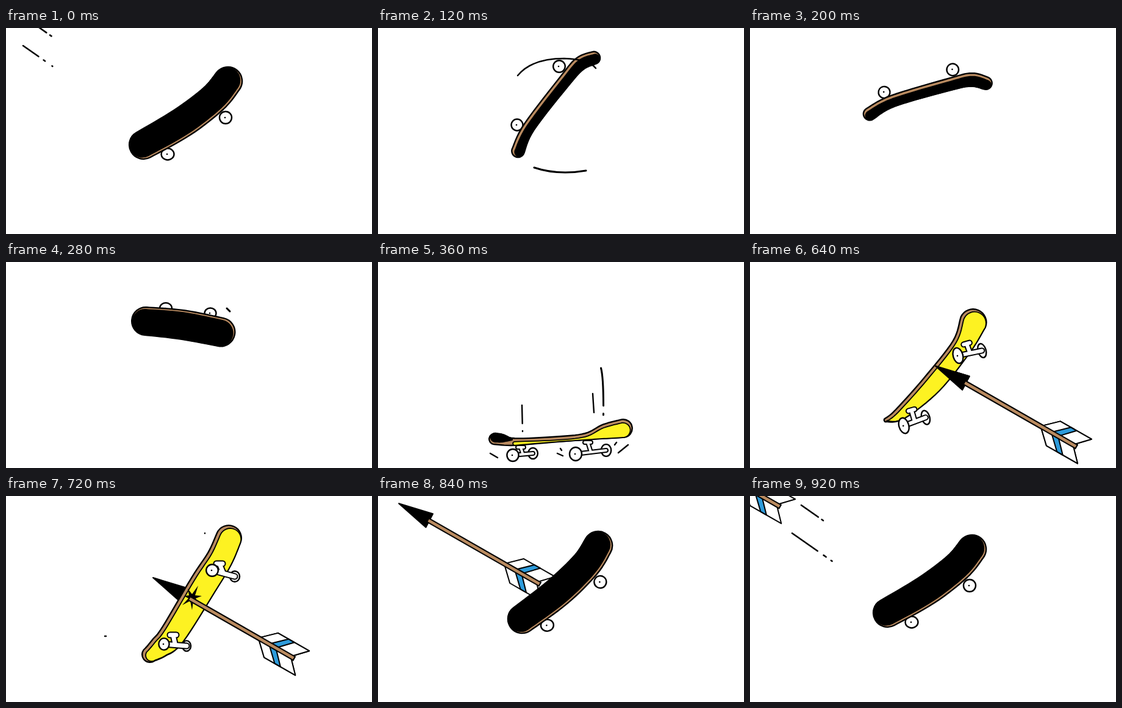
Animation, 600 px wide and 338 px high, one loop 960 ms. Source, as an HTML page:

```html
<!DOCTYPE html>
<html lang="en">
<head>
<meta charset="utf-8">
<title>Skateboard and arrow</title>
<style>
html, body { margin: 0; width: 100%; height: 100%; overflow: hidden; background: #fff; }
svg { display: block; width: 600px; height: 338px; }
</style>
</head>
<body>
<svg id="stage" viewBox="0 0 600 338" fill="none" stroke="#000" stroke-width="2.4" stroke-linecap="round" stroke-linejoin="round"></svg>
<script>
const LOOP = 960, TICK = 40;
const INK = '#000', WOOD = '#ba8b60', YELLOW = '#fdf222', BLUE = '#2d9bdb';
const stage = document.getElementById('stage');

const nodes = text => text.split(' ').map(s => s.split(',').map(Number));

// Smooth run of circles [x, y, r] through a few nodes
function spine(keys) {
  const at = i => keys[Math.max(0, Math.min(keys.length - 1, i))];
  const steps = (keys.length - 1) * 8;
  return Array.from({ length: steps + 1 }, (_, s) => {
    const i = Math.floor(s / 8), t = s / 8 - i;
    const [a, b, c, d] = [at(i - 1), at(i), at(i + 1), at(i + 2)];
    return [0, 1, 2].map(k => b[k] + t / 2 * (c[k] - a[k] +
      t * (2 * a[k] - 5 * b[k] + 4 * c[k] - d[k] + t * (3 * (b[k] - c[k]) + d[k] - a[k]))));
  });
}

// Round-ended outline around a spine, shrunk and shifted
function ribbon(keys, fill, shrink, [sx, sy] = [0, 0], w = 2.4) {
  const run = spine(keys), last = run.length - 1;
  const radius = i => Math.max(0.8, run[i][2] - shrink);
  const side = sign => run.map(([x, y], i) => {
    const p = run[Math.max(0, i - 1)], q = run[Math.min(last, i + 1)];
    const dx = q[0] - p[0], dy = q[1] - p[1], k = sign * radius(i) / Math.hypot(dx, dy);
    return [x + sx - dy * k, y + sy + dx * k].map(v => v.toFixed(2)).join();
  });
  const cap = i => `A${radius(i)} ${radius(i)} 0 0 0 `;
  const a = side(1), b = side(-1).reverse();
  return `<path d="M${a.join('L')}${cap(last)}${b.join('L')}${cap(0)}${a[0]}Z" fill="${fill}" stroke-width="${w}"/>`;
}

// Wooden body with a face pushed aside, so that the edge shows
function deck(text, face, shift, from = 0) {
  const keys = nodes(text), s = Math.hypot(...shift);
  return ribbon(keys, WOOD, 1.2) + ribbon(keys.slice(from), face, 1.2 + s, shift, 1.8);
}

const line = (d, w = 2.4, dash = 'none') =>
  `<path d="${d}" stroke-width="${w}" stroke-dasharray="${dash}"/>`;
const poly = (pts, fill) => `<polygon points="${pts}" fill="${fill}" stroke-width="2"/>`;
const wheel = (x, y, rx, ry = rx) =>
  `<ellipse cx="${x}" cy="${y}" rx="${rx}" ry="${ry}" fill="#fff"/>` +
  `<circle cx="${x - 1}" cy="${y}" r="1.3" fill="${INK}" stroke="none"/>`;

// Two wheels on an axle that hangs from a mount
function truck(near, far, mount, rx, ry, w) {
  const mid = near.map((v, k) => (v + far[k]) / 2);
  const d = `M${near}L${far}M${mid}L${mount}m-5,0h10`;
  return wheel(...far, rx * 0.82, ry * 0.9) +
    line(d, w) + `<path d="${d}" stroke="#fff" stroke-width="${w - 4}"/>` +
    wheel(...near, rx, ry);
}

const deckTop = wheel(360, 147, 10) + wheel(265, 207, 10.5, 9.5) +
  deck('225,192,24.5 289,155,25.5 340,116,25 364,87,24.5', INK, [-1.8, -1.2]);

const deckSide = wheel(228, 159, 9.5) + wheel(297, 63, 9.8) +
  deck('229.5,202,11.5 248,162,10.5 309,83,11 332,58,12 354,49,11.5', INK, [2.2, 1.7]);

const deckBack = wheel(262, 76, 10, 9) + wheel(335, 84, 9.5, 8.5) +
  deck('229,97,24 290,103,25 352,115,24.5', INK, [-1.4, 1.6]);

const landed =
  deck('191,290.5,10 224,295,7 290,291,5.5 340,286.5,6.5 372,278,13 402,273,16', YELLOW, [0, 2.8], 1) +
  ribbon(nodes('192,288,8 204,289,7 219,291,2'), INK, 1) +
  truck([324, 315], [374, 309], [344, 296], 10, 11, 8) +
  truck([221, 317], [254, 314], [234, 304], 9.6, 10, 8);

const rising =
  deck('201,274,4 228,270,11.5 290,238,17.5 354,192,18 383,159,23', YELLOW, [1.7, 2.4]) +
  truck([344, 205], [384, 208], [363, 190], 8, 13, 10) +
  truck([227, 291], [265, 288], [246, 270], 8, 13, 10);

// Torn hole, longest along the board
const hole = Array.from({ length: 14 }, (_, i) => {
  const a = i * Math.PI / 7 - 1.1;
  const r = i % 2 ? 6 : 13 + 9 * Math.cos(a + 1.1) ** 2;
  return [305 + r * Math.cos(a), 167 + r * Math.sin(a)].map(Math.round).join();
}).join(' ');

const pierced =
  deck('236,260,14 252,248,18.5 274,226,22 323,146,23.5 350,103,22.5 365,69,22', YELLOW, [2.7, 1.5]) +
  truck([338, 122], [375, 132], [350, 111], 9.8, 9.8, 11) +
  truck([259, 243], [296, 246], [274, 228], 8.6, 9.6, 11) +
  `<polygon points="${hole}" fill="${INK}" stroke="none"/>`;

// Tip at 0,0 and shaft along x
const vane = (a, b, fill) => [-1, 1].map(s =>
  poly(`${a},0 ${a + 24},${23 * s} ${b + 22},${23 * s} ${b},0`, fill)).join('');
const arrow = '<g transform="translate(241 134) rotate(29.8)">' +
  poly('0,0 57,-13 58,12', INK) + vane(199, 260, '#fff') + vane(219, 232, BLUE) +
  '<g stroke-linecap="butt">' + line('M55,0H267.5', 8.6) +
  `<path d="M56,0H265.5" stroke="${WOOD}" stroke-width="4.6"/></g></g>`;

const swirl = line('M229,78Q252,50 305,50Q345,51 357,66') + line('M256,229Q295,242 341,234', 3);
const nick = line('M362,76L367,81', 3);
const fall = line('M236,235L237,278', 2.4, '30 12 1') + line('M352,216L354,247') +
  line('M365.5,174Q370,190 369.5,251', 3, '62 13 3');
const bump = line('M184,314L196,321M294,314L303,318M299,306L301,309M388,300L391,296M394,313L410,300');
const pop = line('M331,212Q331,245 326,266M377,212Q381,250 370,283') +
  line('M390,225V257', 3.6, '18 10 3') + line('M297,279L317,264M306,274L315,267', 3) +
  line('M147,294L124,276L143,281M207,301L208,304M223,308V314M246,295V311M254,303L252,308M305,292H311');
const chips = line('M326,61V61.2M162,230H164');
const trail = (x, y, size, dash) =>
  line(`M${x},${y}l${size * 0.82},${size * 0.575}`, 2.6, dash);
const trailOut = trail(84, 15, 44, '34 7 3') + trail(69, 61, 80, '51 12 5 10 2');
const trailEnd = trail(54, -1, 25, '15 7 3') + trail(28, 29, 59, '31 10 3 14 1');

// [first tick, last tick, rest tick, art, drift per tick x, y, turn, pivot x, y, stays at rest]
const marks = [
  [2, 4, 3, swirl, 0, 0, 38, 295, 142],
  [6, 7, 7, nick, 0, 0, 8, 291, 106],
  [9, 10, 9, fall + bump, 0, 0, 0, 0, 0],
  [14, 15, 14, pop, 0, 5, 0, 0, 0],
  [18, 18, 18, chips, 0, 0, 0, 0, 0],
  [22, 23, 23, trailOut, -83, -49, 0, 0, 0],
  [0, 0, 0, trailEnd, 0, 0, 0, 0, 0]
];
const boards = [
  [0, 2, 0, deckTop, 0, -4, 53, 295, 140],
  [3, 5, 3, deckSide, 0, -5, 18, 291, 125],
  [6, 7, 7, deckBack, 0, 2, 12, 291, 106],
  [8, 12, 9, landed, 0, 88, 7, 300, 285, true],
  [13, 16, 14, rising, 0, -20, -8, 302, 210],
  [17, 20, 18, pierced, -3, -2, -3, 304, 168],
  [21, 23, 22, deckTop, -4, -2, 7, 295, 140, true]
];

function place(parts, tick) {
  return parts.filter(p => tick >= p[0] && tick <= p[1])
    .map(([, , rest, art, dx, dy, turn, cx, cy, stop]) => {
      const k = stop ? Math.min(0, tick - rest) : tick - rest;
      return `<g transform="translate(${dx * k} ${dy * k}) rotate(${turn * k} ${cx} ${cy})">${art}</g>`;
    }).join('');
}

// The arrow slows in the board, then pulls through
function flight(tick) {
  if (tick <= 18) {
    const u = (18 - tick) / 4;
    return [251 * u * u, 146 * u * u];
  }
  const u = ((tick - 18) / 5) ** 1.4;
  return [-423 * u, -249 * u];
}

function draw(tick) {
  let back = '', front = '';
  if (tick >= 14) {
    back = `<g transform="translate(${flight(tick)})">${arrow}</g>`;
    if (tick < 21) front = `<g clip-path="url(#near)">${back}</g>`;
  }
  stage.innerHTML =
    '<clipPath id="near"><path d="M396,0L206,338H900V0Z"/></clipPath>' +
    back + place(boards, tick) + place(marks, tick) + front;
}

let shown = -1;
const start = performance.now();
function frame(now) {
  const tick = Math.floor(Math.max(0, now - start) % LOOP / TICK);
  if (tick !== shown) draw(shown = tick);
  requestAnimationFrame(frame);
}
frame(start);
</script>
</body>
</html>
```
